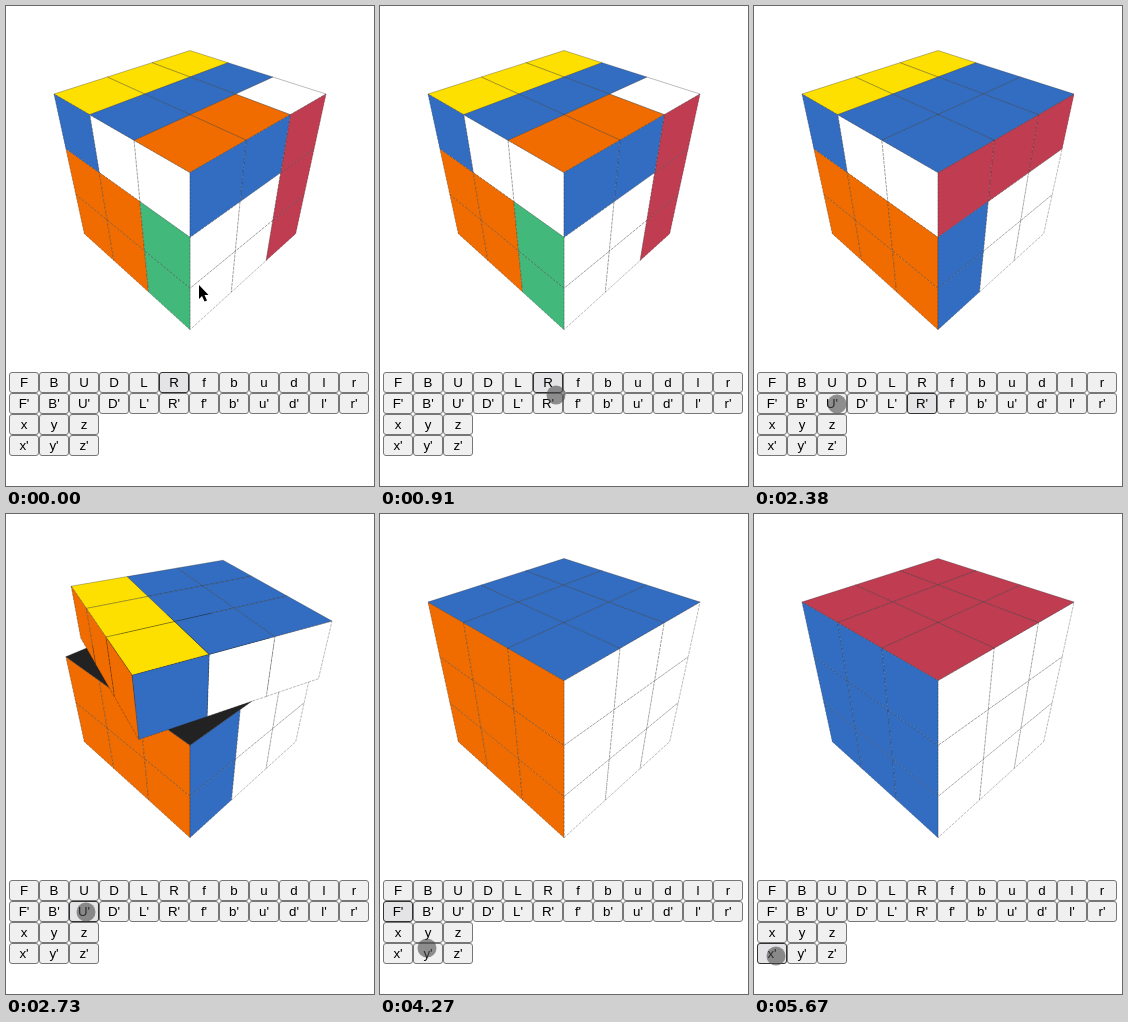
Write an HTML page with a canvas that moves like this. It is 368 by 480 pixels and loops after 5.81 s.

```html
<!DOCTYPE html>
<html lang="en">
<head>
<meta charset="utf-8">
<title>Cube</title>
<style>
  html, body { margin: 0; width: 100%; height: 100%; overflow: hidden; background: #fff; }
  canvas { position: absolute; left: 0; top: 0; }
  .key {
    position: absolute; box-sizing: border-box; width: 30px; height: 21px;
    border: 1px solid #777; border-radius: 3px; background: #f0f0f0; color: #000;
    font: 13.33px/19px "Liberation Sans", Arial, sans-serif; text-align: center;
  }
  .key.focus { background: #e4e4e6; border-color: #333; }
</style>
</head>
<body>
<canvas id="stage" width="368" height="480"></canvas>
<script>
const LOOP = 5810, STEP = 70, TURN = 150;
const ctx = document.getElementById('stage').getContext('2d');

// Buttons
const keys = {};
['F B U D L R f b u d l r', "F' B' U' D' L' R' f' b' u' d' l' r'", 'x y z', "x' y' z'"]
  .forEach((row, j) => row.split(' ').forEach((name, i) => {
    const el = document.createElement('div');
    el.className = 'key';
    el.textContent = name;
    el.style.left = 3 + 30 * i + 'px';
    el.style.top = 366 + 21 * j + 'px';
    document.body.insertBefore(el, ctx.canvas);
    keys[name] = el;
  }));

// All turns run in the positive sense about their axis (0 x, 1 y, 2 z)
const moves = [
  { key: "R'", press: 1940, start: 1955, axis: 0 },
  { key: "U'", press: 2570, start: 2610, axis: 1 },
  { key: "F'", press: 3420, start: 3570, axis: 2 },
  { key: "x'", press: 5140, start: 5222, axis: 0, whole: true }
];

// Stickers of the solved cube: corner points on a cube of half size 1
const colors = [['#ffffff', '#fde000'], ['#c03c51', '#f06c00'], ['#326dc2', '#42b87b']];
const stickers = [];
const quad = (axis, depth, u, v, size) => [[-1, -1], [1, -1], [1, 1], [-1, 1]].map(([a, b]) => {
  const p = [];
  p[axis] = depth;
  p[(axis + 1) % 3] = u + a * size;
  p[(axis + 2) % 3] = v + b * size;
  return p;
});
for (let axis = 0; axis < 3; axis++)
  for (const side of [1, -1])
    for (let i = -1; i < 2; i++)
      for (let j = -1; j < 2; j++) {
        const normal = [0, 0, 0];
        normal[axis] = side;
        stickers.push({
          pts: quad(axis, side, i * 2 / 3, j * 2 / 3, 1 / 3),
          normal,
          color: colors[axis][side > 0 ? 0 : 1]
        });
      }

function rotate(p, axis, angle) {
  const a = (axis + 1) % 3, b = (axis + 2) % 3, q = [...p];
  const c = Math.cos(angle), s = Math.sin(angle);
  q[a] = p[a] * c - p[b] * s;
  q[b] = p[a] * s + p[b] * c;
  return q;
}

// Camera on the diagonal, looking at the centre
const DIST = 4.6, FOCAL = 387, CX = 184, CY = 166.6;
const depthOf = p => (p[0] + p[1] + p[2]) / Math.sqrt(3);
function project(p) {
  const k = FOCAL / (DIST - depthOf(p));
  return [
    CX + k * (p[0] - p[2]) / Math.SQRT2,
    CY - k * (2 * p[1] - p[0] - p[2]) / Math.sqrt(6)
  ];
}

function fillQuad(pts, color, dash) {
  ctx.beginPath();
  pts.forEach(p => ctx.lineTo(...project(p)));
  ctx.closePath();
  ctx.fillStyle = color;
  ctx.fill();
  ctx.setLineDash(dash);
  ctx.lineWidth = 0.6;
  ctx.strokeStyle = 'rgba(30,30,30,.5)';
  ctx.stroke();
}

const progress = (m, t) => Math.min(1, Math.max(0, (t - m.start) / TURN));
const mean = (pts, axis) => pts.reduce((sum, p) => sum + p[axis], 0) / 4;

function drawCube(t) {
  const active = moves.find(m => progress(m, t) > 0 && progress(m, t) < 1);
  const still = [], turning = [];
  for (const s of stickers) {
    let { pts, normal } = s, group = still;
    // Take back, last turn first, whatever has not happened yet
    for (const m of [...moves].reverse()) {
      const left = 1 - progress(m, t);
      if (!left || !(m.whole || mean(pts, m.axis) > 0.5)) continue;
      const angle = -left * Math.PI / 2;
      pts = pts.map(p => rotate(p, m.axis, angle));
      normal = rotate(normal, m.axis, angle);
      if (m === active) group = turning;
    }
    const p = pts[0];
    const facing = normal.reduce((sum, n, i) => sum + n * (DIST / Math.sqrt(3) - p[i]), 0);
    if (facing > 0) group.push({ pts, color: s.color, dash: normal[1] > 0.5 ? [] : [3, 1] });
  }
  const draw = q => fillQuad(q.pts, q.color, q.dash);
  still.forEach(draw);
  if (active && !active.whole) fillQuad(quad(active.axis, 1 / 3, 0, 0, 1), '#222', []);
  turning.forEach(draw);
}

// Pointer: time, x, y
const path = [
  [0, 193, 279], [70, 193, 279], [560, 180, 375], [910, 176, 389], [1260, 175, 394],
  [1540, 174, 411], [1820, 173, 396], [2030, 173, 396], [2310, 88, 398], [2380, 83, 398],
  [2730, 80, 398], [3100, 18, 400], [3430, 17, 401], [4060, 17, 401], [4270, 47, 434],
  [4620, 24, 440], [4760, 22, 441], [5670, 22, 442], [LOOP, 22, 442]
];

function drawPointer(t) {
  const i = path.findIndex(k => k[0] > t);
  const a = path[i - 1], b = path[i], f = (t - a[0]) / (b[0] - a[0]);
  const x = a[1] + (b[1] - a[1]) * f, y = a[2] + (b[2] - a[2]) * f;
  ctx.beginPath();
  ctx.setLineDash([]);
  if (t < 140) {
    [[0, 0], [0, 14], [3, 11], [5.5, 16.5], [8, 15.5], [5.5, 10], [9.5, 10]]
      .forEach(([dx, dy]) => ctx.lineTo(x + dx, y + dy));
    ctx.closePath();
    ctx.lineWidth = 2;
    ctx.strokeStyle = '#fff';
    ctx.stroke();
    ctx.fillStyle = '#000';
  } else {
    ctx.arc(x, y, 9.5, 0, 2 * Math.PI);
    ctx.fillStyle = 'rgba(75,75,75,.6)';
  }
  ctx.fill();
}

function frame() {
  const t = Math.floor(performance.now() % LOOP / STEP) * STEP;
  const last = moves.filter(m => m.press <= t).pop();
  const focus = last ? last.key : 'R';
  for (const name in keys) keys[name].classList.toggle('focus', name === focus);
  ctx.clearRect(0, 0, 368, 480);
  drawCube(t);
  drawPointer(t);
  requestAnimationFrame(frame);
}
frame();
</script>
</body>
</html>
```
